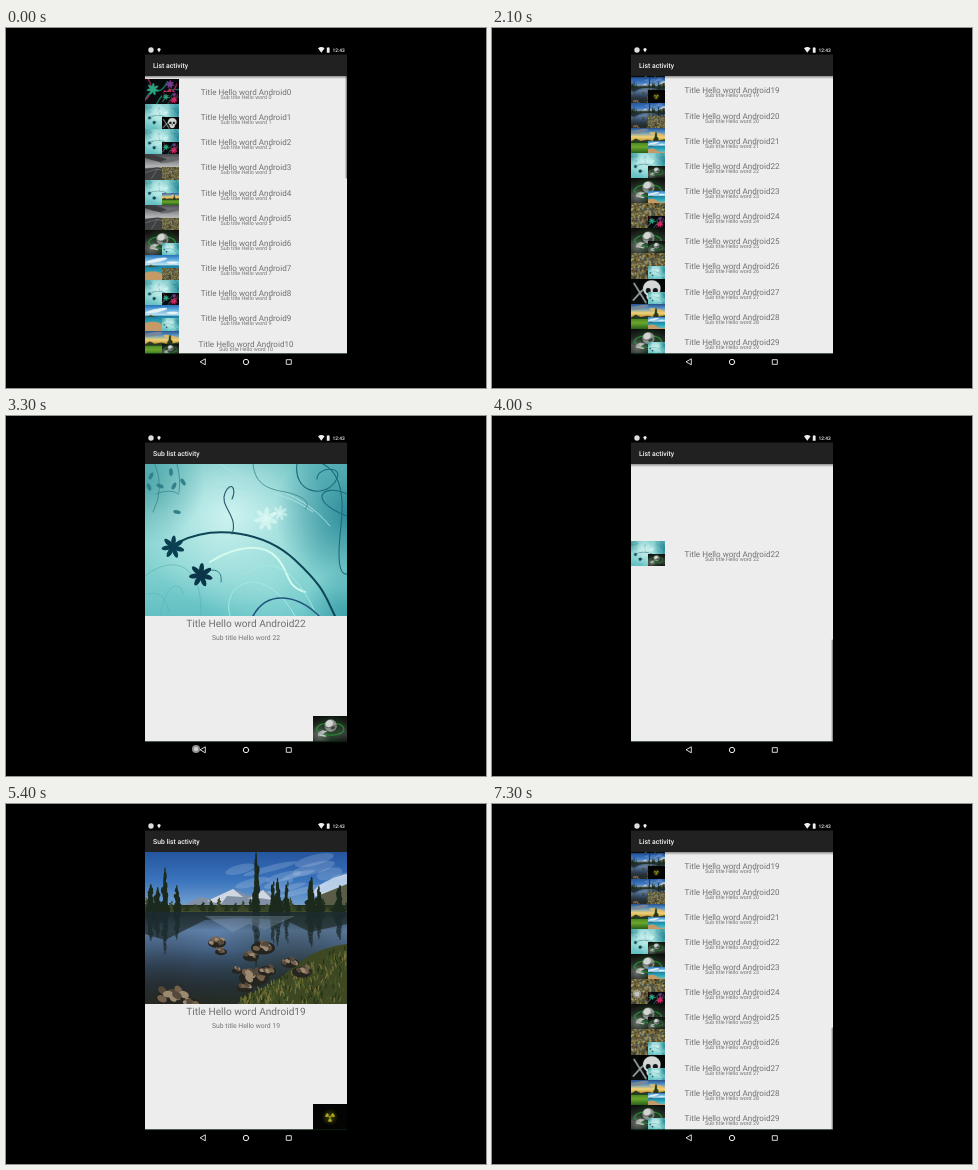
An HTML page with a canvas for the animation above (7.4 s loop, 480 by 360 pixels).

```html
<!DOCTYPE html>
<html lang="en">
<head>
<meta charset="utf-8">
<title>List activity</title>
<style>
html, body { margin: 0; width: 100%; height: 100%; overflow: hidden; background: #000; }
canvas { display: block; width: 480px; height: 360px; }
</style>
</head>
<body>
<canvas id="stage" width="480" height="360"></canvas>
<script>
const LOOP = 7400, LEFT = 139, WIDTH = 202, TOP = 48, BOTTOM = 326;
const ROW_H = 25.15, FIRST_ROW = 51, ROWS = 30, THUMB_W = 33.5;
const MAX_SCROLL = FIRST_ROW + ROWS * ROW_H - BOTTOM;
const ctx = document.getElementById('stage').getContext('2d');
ctx.textRendering = 'geometricPrecision';
ctx.imageSmoothingQuality = 'high';

const clamp = x => Math.max(0, Math.min(1, x));
const mix = (a, b, k) => a + (b - a) * k;
const ramp = (t, start, length) => {
  const x = clamp((t - start) / length);
  return x * x * (3 - 2 * x);
};
function randomizer(seed) {
  return () => (seed = (seed * 16807) % 2147483647) / 2147483647;
}

// Drawing helpers
function fade(g, colors, y0 = 0, y1 = 152) {
  const gradient = g.createLinearGradient(0, y0, 0, y1);
  colors.forEach((c, i) => gradient.addColorStop(i / (colors.length - 1), c));
  g.fillStyle = gradient;
  g.fillRect(0, y0, 202, y1 - y0);
}
function glow(g, x, y, r, rgb, alpha) {
  const gradient = g.createRadialGradient(x, y, 0, x, y, r);
  gradient.addColorStop(0, `rgba(${rgb},${alpha})`);
  gradient.addColorStop(1, `rgba(${rgb},0)`);
  g.fillStyle = gradient;
  g.fillRect(0, 0, 202, 152);
}
function oval(g, x, y, rx, ry, color, turn = 0) {
  g.fillStyle = color;
  g.beginPath();
  g.ellipse(x, y, rx, ry, turn, 0, 7);
  g.fill();
}
function line(g, d, color, width = 1) {
  g.strokeStyle = color;
  g.lineWidth = width;
  g.lineCap = 'round';
  g.stroke(new Path2D(d));
}
function shape(g, d, color) {
  g.fillStyle = color;
  g.fill(new Path2D(d));
}
function tree(g, x, top, base, w, color = '#1b2a1d') {
  const rnd = randomizer(x * 31 + 7), step = (base - top) / 9;
  for (let i = 0; i < 9; i++) {
    const y = top + i * step, half = w * (0.2 + i / 12) * (0.7 + rnd() * 0.5);
    oval(g, x + rnd() * 2 - 1, y + step / 2, half, Math.abs(step) * .85, color);
  }
}
function flower(g, x, y, r, color) {
  for (let i = 0; i < 7; i++) {
    const a = i * 0.9 + 0.3;
    oval(g, x + Math.cos(a) * r * 0.55, y + Math.sin(a) * r * 0.55, r * 0.55, r * 0.22, color, a);
  }
}
function skull(g, x, y, s, color) {
  oval(g, x, y, 42 * s, 40 * s, color);
  oval(g, x, y + 38 * s, 25 * s, 24 * s, color);
  oval(g, x - 17 * s, y + 10 * s, 12 * s, 13 * s, '#101414');
  oval(g, x + 17 * s, y + 10 * s, 12 * s, 13 * s, '#101414');
  oval(g, x, y + 30 * s, 5 * s, 8 * s, '#202424');
}

// Pictures, each 202 x 152
const painters = {
  teal(g) {
    fade(g, ['#69bfc1', '#8ad4d2', '#83d2d0', '#62c0c3']);
    glow(g, 85, 52, 95, '212,246,243', .9);
    glow(g, 125, 120, 70, '165,228,224', .55);
    glow(g, 205, 50, 75, '18,120,138', .8);
    glow(g, 202, 150, 45, '25,130,148', .5);
    glow(g, 0, 20, 60, '45,140,145', .55);
    line(g, 'M0 112 C35 85 60 110 55 152 M15 152 C20 120 35 115 38 130 M3 130 Q20 125 24 148', '#60b3b7', .7);
    line(g, 'M75 0 C110 25 150 20 185 62 M62 20 C100 30 130 20 168 48', '#a9e2df', 1);
    line(g, 'M65 98 C90 82 118 78 132 94 S140 122 160 128', '#d3faec', 2);
    line(g, 'M85 152 C75 120 118 95 150 152 M100 110 Q140 80 172 152', '#a5e9e2', 1);
    line(g, 'M34 78 C70 60 120 68 150 96 S180 132 190 152', '#0d4657', 2);
    line(g, 'M56 111 C68 102 78 106 76 118', '#2b7e89', 1);
    line(g, 'M108 152 C122 126 152 130 174 152', '#21557e', 1.6);
    line(g, 'M87 70 C94 52 74 42 80 29 S92 25 87 35', '#24596a', 1.1);
    line(g, 'M108 0 C110 22 125 25 140 28 S168 38 160 45', '#35808a', .8);
    line(g, 'M152 0 C148 28 178 35 190 18 S172 2 172 15 M202 30 C175 18 163 38 202 52 M178 0 Q202 12 196 62 T202 110', '#1c6b7d', 1.1);
    line(g, 'M10 0 Q20 25 8 48 M11 30 Q25 24 34 30 M32 0 Q36 15 34 28', '#3c848b', .8);
    for (const [x, y, a] of [[4, 23, 1.2], [15, 22, .4], [29, 22, 2], [38, 18, 1], [6, 12, 2], [32, 48, .2], [26, 8, 1.5]])
      oval(g, x, y, 3.8, 1.9, '#32818a', a);
    flower(g, 121, 55, 11, 'rgba(225,250,246,.65)');
    flower(g, 135, 49, 7, 'rgba(225,250,246,.55)');
    flower(g, 28, 83, 10.5, '#0b4052');
    flower(g, 56, 111, 11, '#0b3549');
  },
  lake(g) {
    fade(g, ['#24559f', '#3b75bd', '#7fa9d4'], 0, 58);
    const rnd = randomizer(93);
    for (let i = 0; i < 14; i++)
      oval(g, 95 + rnd() * 107, 8 + rnd() * 40, 10 + rnd() * 18, 2 + rnd() * 4, 'rgba(215,226,240,.2)', -.25);
    oval(g, 190, 33, 24, 7, 'rgba(225,234,244,.75)', -.4);
    shape(g, 'M30 58 L55 45 70 48 88 37 103 44 118 38 135 48 155 58Z', '#8190a4');
    shape(g, 'M62 49 L88 37 98 45 82 44 76 52Z M103 47 L118 38 128 48 114 46Z', '#cfd8e0');
    shape(g, 'M150 60 L175 43 202 32 V60Z', '#5a5c47');
    fade(g, ['#222e1d', '#4d5930'], 53, 61);
    for (let i = 0; i < 26; i++) tree(g, i * 8 + 2, 46 + (i * 7) % 9, 59, 4, i % 3 ? '#22301f' : '#3a4727');
    const pines = [[20, 17, 5], [32, 34, 5], [6, 33, 7], [12, 36, 6], [111, 2, 6], [128, 30, 5], [133, 27, 5], [142, 30, 4], [166, 26, 7], [174, 35, 6], [194, 34, 7]];
    pines.forEach(([x, y, w]) => tree(g, x, y, 60, w));
    fade(g, ['#2a3a49', '#5f80a8', '#4c6d98', '#344f71', '#26384d', '#26302f'], 60, 152);
    shape(g, 'M0 60 H202 V72 L165 80 140 68 95 66 60 68 40 78 20 88 0 82Z', 'rgba(28,40,38,.7)');
    g.globalAlpha = .65;
    pines.forEach(([x, y, w]) => tree(g, x, 116 - y * .85, 61, w, '#1a2a2c'));
    g.globalAlpha = 1;
    shape(g, 'M60 64 L88 80 104 72 120 78 150 64Z', 'rgba(150,172,198,.35)');
    glow(g, 20, 160, 90, '38,38,30', .85);
    glow(g, 150, 160, 110, '35,40,22', .9);
    shape(g, 'M92 152 C105 140 125 135 145 118 S180 95 202 92 V152Z', '#3d4822');
    for (let i = 0; i < 260; i++) {
      const x = 95 + rnd() * 107, y = 153 - rnd() * Math.max(3, (x - 88) * .53);
      line(g, `M${x} ${y} l${rnd() * 4 - 2} -4`, ['#6a6c30', '#242f18', '#7d7440', '#45572a'][i % 4], 1.1);
    }
    for (const [x, y, r] of [[72, 89, 9], [76, 98, 6], [106, 103, 8], [118, 94, 12], [109, 124, 15], [122, 117, 9], [28, 144, 17], [46, 150, 10], [145, 109, 9], [157, 118, 10], [92, 117, 5], [100, 134, 8]]) {
      oval(g, x, y + 2, r, r * .55, '#26241f');
      for (let i = 0; i < 9; i++)
        oval(g, x + (rnd() - .5) * r * 1.3, y + (rnd() - .6) * r * .6, r * .3, r * .2, ['#75614b', '#9c8a70', '#54493b'][i % 3], rnd());
    }
  },
  neon(g) {
    fade(g, ['#05090a', '#0b0b10']);
    line(g, 'M0 130 C50 20 80 120 130 25 M70 152 Q120 50 202 65', '#168c72', 7);
    line(g, 'M20 0 Q60 70 10 120 M110 152 C100 90 165 115 190 30', '#b51d5a', 7);
    flower(g, 48, 62, 34, '#2ba482');
    flower(g, 145, 100, 40, '#d32862');
    flower(g, 150, 32, 24, '#7d3b91');
  },
  storm(g) {
    fade(g, ['#48494c', '#85878a', '#b9baba', '#4b4c4f', '#2d2e30']);
    oval(g, 60, 22, 90, 16, '#3a3c40', .25);
    oval(g, 155, 36, 65, 10, '#66686c', -.2);
    shape(g, 'M0 85 L75 77 145 87 202 80 V152 H0Z', '#3f4042');
    line(g, 'M0 110 L75 88 202 125 M40 145 L75 90', '#747678', 4);
  },
  pebbles(g) {
    fade(g, ['#5e5b35', '#55502e']);
    const rnd = randomizer(51), colors = ['#98934c', '#332f22', '#788578', '#a17b3d', '#394d51', '#b1ad7c', '#6e4c32'];
    for (let i = 0; i < 330; i++)
      oval(g, rnd() * 202, rnd() * 152, 4 + rnd() * 5, 3 + rnd() * 3, colors[i % 7], rnd() * 3);
  },
  field(g) {
    fade(g, ['#244d87', '#5a95c4', '#f0d477', '#c98a2d'], 0, 84);
    oval(g, 50, 22, 55, 11, '#798796', -.2);
    oval(g, 155, 40, 45, 9, '#e4bd65', .2);
    fade(g, ['#3e7b22', '#6ca72d', '#28631b'], 80, 152);
    shape(g, 'M0 85 L30 65 58 80 100 73 145 83 202 70 V92 H0Z', '#263b21');
    tree(g, 150, 28, 94, 22, '#26391c');
  },
  beach(g) {
    fade(g, ['#2774bc', '#6eb8e4', '#d7ecf2'], 0, 65);
    oval(g, 70, 32, 65, 11, '#e5f1f5', -.2);
    oval(g, 165, 45, 35, 7, '#eef5f6');
    fade(g, ['#187ba8', '#33a8b7', '#77c6b7'], 62, 152);
    shape(g, 'M0 108 Q65 85 105 118 T202 140 V152 H0Z', '#c69a66');
    shape(g, 'M0 72 L35 58 65 68 90 72Z', '#31563d');
  },
  ball(g) {
    fade(g, ['#0c0e0c', '#232623', '#3c3f3c', '#161816']);
    glow(g, 40, 120, 70, '135,140,135', .6);
    glow(g, 105, 75, 95, '30,105,40', .55);
    line(g, 'M22 78 C25 28 178 28 182 75 S45 125 22 78', '#2a9c3c', 6);
    glow(g, 105, 62, 62, '20,25,20', .5);
    oval(g, 105, 56, 36, 36, '#8d928d');
    oval(g, 97, 44, 23, 20, '#d2d6d2', -.5);
    oval(g, 118, 68, 14, 10, '#3e443e', -.4);
    line(g, 'M72 62 Q100 78 140 52', '#505650', 4);
    oval(g, 50, 100, 24, 13, '#a9ada9', -.6);
    line(g, 'M45 112 L75 118 M55 96 L78 90', '#c6cac6', 8);
  },
  skull(g) {
    fade(g, ['#030404', '#0b0d0e']);
    skull(g, 125, 60, 1.25, '#d5d9d6');
    line(g, 'M20 30 L90 145 M15 130 L70 70', '#9ca7a4', 10);
  },
  hazard(g) {
    fade(g, ['#020302', '#050604']);
    glow(g, 101, 76, 50, '125,140,10', .5);
    for (let i = 0; i < 3; i++) {
      const a = i * Math.PI * 2 / 3 + Math.PI / 6 + Math.PI;
      g.beginPath();
      g.arc(101, 76, 28, a - .5, a + .5);
      g.arc(101, 76, 10, a + .5, a - .5, true);
      g.fillStyle = '#b3a524';
      g.fill();
    }
    oval(g, 101, 76, 6, 6, '#b3a524');
  }
};
const pictures = {};
for (const name in painters) {
  const canvas = document.createElement('canvas');
  canvas.width = 202;
  canvas.height = 152;
  painters[name](canvas.getContext('2d'));
  pictures[name] = canvas;
}

// Main and inset picture of every row
const items = `neon neon,teal skull,teal neon,storm pebbles,teal field,storm pebbles,ball teal,
beach pebbles,teal neon,beach teal,field ball,beach teal,storm neon,lake beach,pebbles skull,
skull hazard,teal skull,lake neon,skull skull,lake hazard,lake pebbles,field beach,teal ball,
ball beach,pebbles neon,ball ball,pebbles teal,skull teal,field beach,ball teal`
  .split(',').map(pair => pair.trim().split(' '));

const visits = [
  { row: 22, open: 2100, close: 3300, backX: 190 },
  { row: 19, open: 4500, close: 6100, backX: 197 }
];

function label(text, x, y, size, color, align = 'center', weight = 400) {
  ctx.font = `${weight} ${size}px Roboto, sans-serif`;
  ctx.textAlign = align;
  ctx.fillStyle = color;
  ctx.fillText(text, x, y);
}
function touch(x, y, alpha) {
  oval(ctx, x, y, 4, 4, `rgba(190,190,190,${alpha})`);
  oval(ctx, x, y, 2.2, 2.2, `rgba(225,225,225,${alpha})`);
}

// k = 0 is the list row, k = 1 the detail page
function drawItem(row, y, k = 0) {
  const [main, inset] = items[row];
  ctx.drawImage(pictures[main], LEFT, mix(y, TOP, k), mix(THUMB_W, WIDTH, k), mix(ROW_H, 152, k));
  ctx.drawImage(pictures[inset], mix(LEFT + 17, 307, k), mix(y + 13, 300, k),
    mix(16.5, 34, k), mix(12.15, 26, k));
  label(`Title Hello word Android${row}`, 240, mix(y + 16, 211, k), mix(8.05, 10.15, k), '#707070');
  label(`Sub title Hello word ${row}`, 240, mix(y + 20, 224.3, k), mix(5.4, 6.8, k), '#747474');
}

function drawPress(y, age) {
  if (age < 60 || age > 560) return;
  ctx.save();
  ctx.beginPath();
  ctx.rect(LEFT, y, WIDTH, ROW_H);
  ctx.clip();
  ctx.fillStyle = 'rgba(0,0,0,.06)';
  ctx.fillRect(LEFT, y, WIDTH, ROW_H);
  oval(ctx, 222, y + 12, 0.28 * age, 0.28 * age, 'rgba(0,0,0,.045)');
  ctx.restore();
}

function drawList(t, visit, spread) {
  const scroll = MAX_SCROLL * (1 - Math.pow(1 - clamp((t - 880) / 600), 2.33));
  const rowY = row => FIRST_ROW + row * ROW_H - scroll;
  drawPress(rowY(visit.row), t - visit.open);
  for (let row = 0; row < ROWS; row++) {
    const y = rowY(row) + Math.sign(row - visit.row) * spread * 300;
    if (y > TOP - ROW_H && y < BOTTOM) drawItem(row, y);
  }
  const barAlpha = t < 880 ? 1 - ramp(t, 100, 300) : t < 3300 ? 1 - ramp(t, 1650, 250) : 1;
  ctx.fillStyle = `rgba(125,125,125,${barAlpha * .8})`;
  ctx.fillRect(339.6, 48 + scroll / MAX_SCROLL * 175.6, 1.4, 102.4);
}

function drawBars(t, detail, visit) {
  ctx.fillStyle = '#000';
  ctx.fillRect(LEFT, 0, WIDTH, 27);
  ctx.fillRect(LEFT, BOTTOM, WIDTH, 34);
  ctx.fillStyle = '#06220f';
  ctx.fillRect(LEFT, BOTTOM - .7, WIDTH, .9);
  ctx.fillStyle = '#212121';
  ctx.fillRect(LEFT, 26.5, WIDTH, TOP - 26.5);
  if (!detail) {
    const shadow = ctx.createLinearGradient(0, TOP, 0, TOP + 3);
    shadow.addColorStop(0, 'rgba(0,0,0,.4)');
    shadow.addColorStop(1, 'rgba(0,0,0,0)');
    ctx.fillStyle = shadow;
    ctx.fillRect(LEFT, TOP, WIDTH, 3);
  }
  label(detail ? 'Sub list activity' : 'List activity', 147, 39.8, 6.85, '#f5f5f5', 'left', 500);

  oval(ctx, 145, 22, 2.7, 2.7, '#ddd');
  oval(ctx, 153, 21.6, 1.6, 1.6, '#eee');
  shape(ctx, 'M152 22.5 H154 L153 24.6Z M312 20.3 Q315.3 17.8 318.6 20.3 L315.3 24.7Z', '#eee');
  shape(ctx, 'M320.8 19.8 H321.6 V19.2 H322.8 V19.8 H323.6 V24.8 H320.8Z', '#eee');
  label('12:43', 338.8, 24.1, 4.9, '#eee', 'right', 500);

  const age = t - visit.close;
  if (age >= 120 && age < 400) {
    ctx.fillStyle = `rgba(60,60,60,${1 - ramp(age, 270, 130)})`;
    ctx.beginPath();
    ctx.roundRect(182, 326, 30, 15.5, 7.5);
    ctx.fill();
  }
  line(ctx, 'M199.3 331.2 V336.8 L194.4 334Z', '#eee', .9);
  line(ctx, 'M242.7 334 a2.7 2.7 0 1 1 -5.4 0 a2.7 2.7 0 1 1 5.4 0', '#eee', 1);
  line(ctx, 'M280.7 331.7 H285.3 V336.3 H280.7Z', '#eee', .9);
  if (age >= 0 && age < 270) touch(visit.backX, 333, .75);
}

function draw(t) {
  const visit = visits[t < 4250 ? 0 : 1];
  const { row, open, close } = visit;
  const spread = ramp(t, open + 160, 245) - ramp(t, close + 580, 300);
  const grow = ramp(t, open + 440, 400), shrink = ramp(t, close + 280, 300);
  const detail = grow > 0 && shrink < 1;

  ctx.fillStyle = '#000';
  ctx.fillRect(0, 0, 480, 360);
  ctx.save();
  ctx.beginPath();
  ctx.rect(LEFT, TOP, WIDTH, BOTTOM - TOP);
  ctx.clip();
  ctx.fillStyle = '#ededed';
  ctx.fillRect(LEFT, TOP, WIDTH, BOTTOM - TOP);
  if (detail) drawItem(row, FIRST_ROW + row * ROW_H - MAX_SCROLL, grow - shrink);
  else drawList(t, visit, spread);
  ctx.restore();
  drawBars(t, detail, visit);
  if (t >= 7200) touch(145, 190, .6);
}

function tick() {
  draw(performance.now() % LOOP);
  requestAnimationFrame(tick);
}
tick();
</script>
</body>
</html>
```
